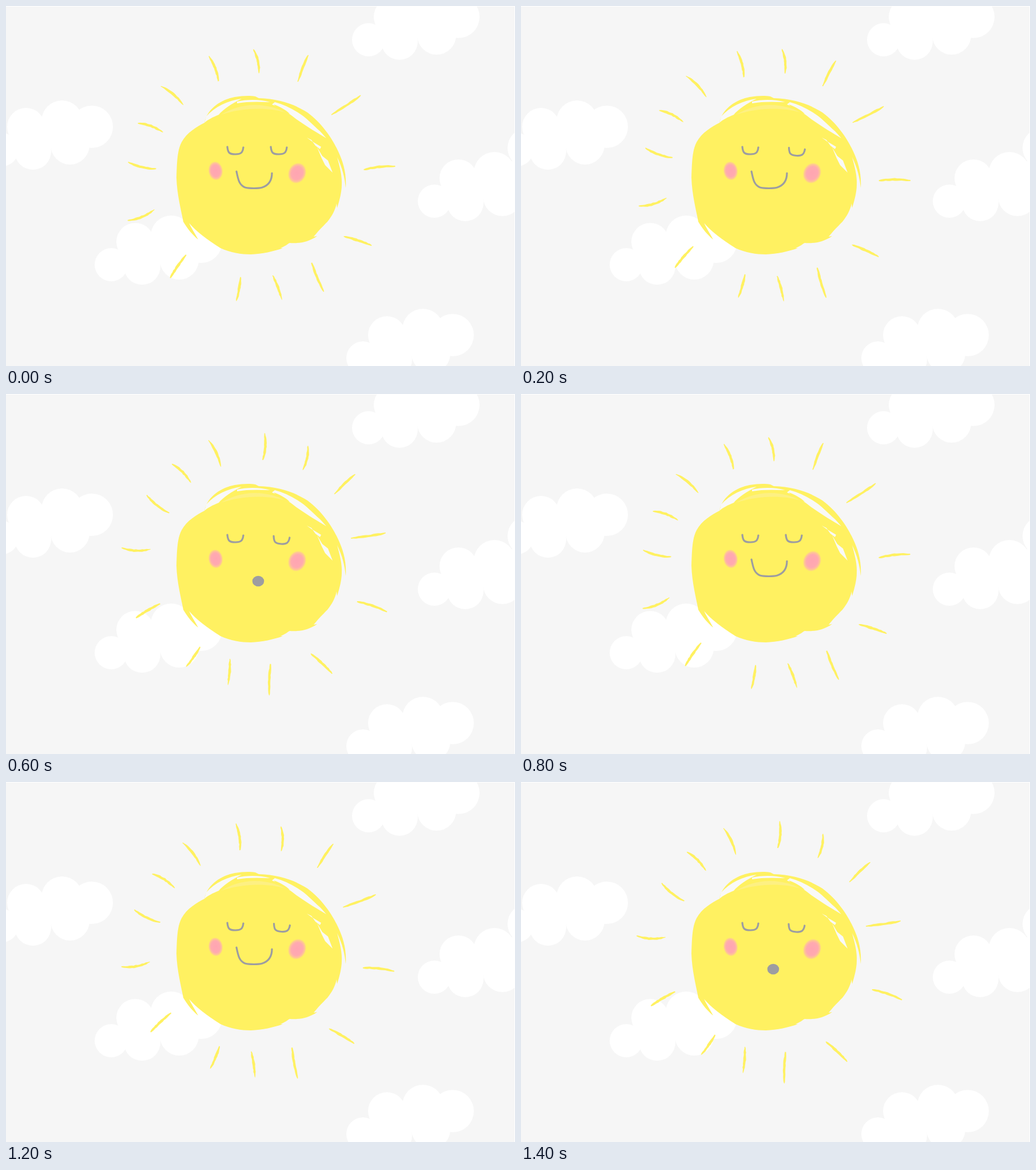
An HTML page for the animation above (1.6 s loop, 890 by 629 pixels).

```html
<!DOCTYPE html>
<html lang="en">
<head>
<meta charset="utf-8">
<title>Sleepy sun</title>
<style>
  html, body { margin: 0; width: 100%; height: 100%; overflow: hidden; background: #f6f6f6; }
  svg { display: block; width: 100%; height: 100%; }
  .line { fill: none; stroke: #9d9da1; stroke-width: 3.2; stroke-linecap: round; stroke-linejoin: round; }
</style>
</head>
<body>
<svg viewBox="0 0 890 629" preserveAspectRatio="none">
  <defs>
    <g id="cloud">
      <circle cx="184" cy="452" r="29"/>
      <circle cx="226" cy="412" r="33"/>
      <circle cx="289" cy="402" r="36"/>
      <circle cx="341" cy="412" r="37"/>
      <circle cx="303" cy="444" r="34"/>
      <circle cx="238" cy="455" r="32"/>
      <path d="M184 452 L226 412 L289 402 L341 412 L303 444 L238 455Z"/>
    </g>
    <radialGradient id="blush">
      <stop offset="0" stop-color="#ffa5b2"/>
      <stop offset=".62" stop-color="#ffaab0"/>
      <stop offset=".85" stop-color="#ffbd9f" stop-opacity=".75"/>
      <stop offset="1" stop-color="#ffe07c" stop-opacity="0"/>
    </radialGradient>
  </defs>

  <rect width="890" height="629" fill="#f6f6f6"/>
  <path d="M0 0H890V629H889V1H0Z" fill="#fff"/>
  <g id="clouds" fill="#fff"><circle cx="912" cy="248" r="35"/></g>

  <!-- sun body -->
  <path fill="#fff161" d="M347 204 C335 210 316 221 307 238 C299 253 299 275 298 300
    C299 330 306 355 310 377 C318 390 326 400 336 408 C330 397 324 388 320 379
    C332 394 352 408 375 423 C392 431 412 434 428 434 C448 433 468 429 484 423 L480 423
    C488 420 492 416 496 414 C513 415 528 413 544 402 L538 403
    C546 393 552 387 562 377 C570 367 576 356 578 345 L579 353
    C583 340 587 325 587 313 C588 295 583 280 579 264 C588 283 592 298 594 318
    C596 290 588 268 578 248 C570 232 553 205 527 186 C505 172 478 162 442 161
    L436 158 C425 156 412 157 400 159 C378 163 352 178 347 204Z"/>
  <!-- brush gaps -->
  <path fill="#f9f9f7" d="M350 193 C365 176 388 165 412 162 C395 170 378 182 372 190 C362 194 352 199 347 204Z
    M404 167 C420 163 445 163 462 168 C440 167 420 167 404 170Z
    M470 168 C500 176 530 195 560 231 C545 222 528 212 508 198 C499 191 485 180 465 172Z
    M526 230 L534 234 L537 238Z
    M536 237 L551 246 L549 250 L541 244Z
    M544 247 L553 262 L563 270 L571 291 L558 278 L552 266Z"/>
  <path fill="#fff161" d="M468 172 C480 176 488 181 496 188 L482 186Z M505 179 C522 188 538 204 549 219 C534 205 520 192 505 179Z"/>
  <path fill="#fdf08c" opacity=".8" d="M376 190 C392 180 412 173 436 173 C455 173 474 178 488 186 C455 176 412 178 376 190Z"/>

  <g id="rays" fill="#fff161"></g>

  <ellipse cx="366.500" cy="288" rx="13" ry="17" transform="rotate(-8 366.5 288)" fill="url(#blush)"/>
  <ellipse cx="509" cy="292" rx="16" ry="19" transform="rotate(24 509 292)" fill="url(#blush)"/>

  <g class="line">
    <path id="eyeL" d="M387 246 C388 256 390 259 401 259 C411 259 414 256 415 247"/>
    <path id="eyeR" d="M387 246 C388 256 390 259 401 259 C411 259 414 256 415 247"/>
    <path id="smile" d="M403 289 C406 304 408 313 418 317 C426 319 441 319 448 317 C460 313 465 305 465 292"/>
  </g>
  <ellipse id="yawn" cx="441" cy="327" rx="10.300" ry="9.300" fill="#9d9da1"/>
</svg>

<script>
const $ = id => document.getElementById(id);
const NS = 'http://www.w3.org/2000/svg';

function add(parent, tag, attrs) {
  const node = document.createElementNS(NS, tag);
  for (const key in attrs) node.setAttribute(key, attrs[key]);
  parent.appendChild(node);
}

for (const [x, y] of [[0, 0], [-191, -201], [450, -393], [565, -111], [440, 163]]) {
  add($('clouds'), 'use', { href: '#cloud', transform: `translate(${x} ${y})` });
}

let seed = 7;
const rand = () => (seed = seed * 16807 % 2147483647) / 2147483647;

// Outer end, inner end, sideways bow of each ray.
const rays = [
  [355, 89, 371, 130, 3], [433, 77, 442, 116, 3], [528, 87, 511, 131, -1],
  [619, 157, 570, 189, 1], [679, 280, 627, 286, -2], [638, 418, 592, 403, -1],
  [555, 498, 535, 450, 1], [482, 512, 467, 472, -1], [403, 514, 410, 475, -1],
  [288, 474, 314, 436, 1], [214, 374, 258, 356, -4], [215, 273, 261, 284, -3],
  [232, 205, 273, 220, 3], [272, 141, 309, 172, 3]
];

// A rough, tapered brush stroke as a closed outline.
function stroke([x1, y1, x2, y2, bow]) {
  const dx = x2 - x1, dy = y2 - y1, len = Math.hypot(dx, dy);
  const ux = dx / len, uy = dy / len, steps = 14;
  const left = [], right = [];
  for (let i = 0; i <= steps; i++) {
    const s = i / steps;
    const along = -1.5 + s * (len + 3);
    const mid = bow * 4 * s * (1 - s);
    const half = 0.7 + 1.5 * Math.pow(Math.sin(Math.PI * s), 0.6);
    const point = side => {
      const off = -mid + side * (half + (rand() - 0.5) * 0.9);
      return (x1 + ux * along - uy * off).toFixed(1) + ' ' + (y1 + uy * along + ux * off).toFixed(1);
    };
    left.push(point(1));
    right.unshift(point(-1));
  }
  return 'M' + left.concat(right).join('L') + 'Z';
}
for (const ray of rays) add($('rays'), 'path', { d: stroke(ray) });

const poses = [
  { turn: 0, eye: 'translate(76 0)', open: false },
  { turn: 6.1, eye: 'translate(81 2.500) rotate(4 401 253)', open: false },
  { turn: 12.4, eye: 'translate(81 2.500) rotate(4 401 253)', open: false },
  { turn: 25, eye: 'translate(80.500 3) rotate(4 401 253)', open: true }
];

function draw(ms) {
  const pose = poses[Math.floor(ms / 200) % poses.length];
  $('rays').setAttribute('transform', `rotate(${pose.turn} 446.5 298)`);
  $('eyeR').setAttribute('transform', pose.eye);
  $('smile').style.display = pose.open ? 'none' : '';
  $('yawn').style.display = pose.open ? '' : 'none';
}

let start;
function tick(now) {
  if (start === undefined) start = now;
  draw((now - start) % 1600);
  requestAnimationFrame(tick);
}
draw(0);
requestAnimationFrame(tick);
</script>
</body>
</html>
```
